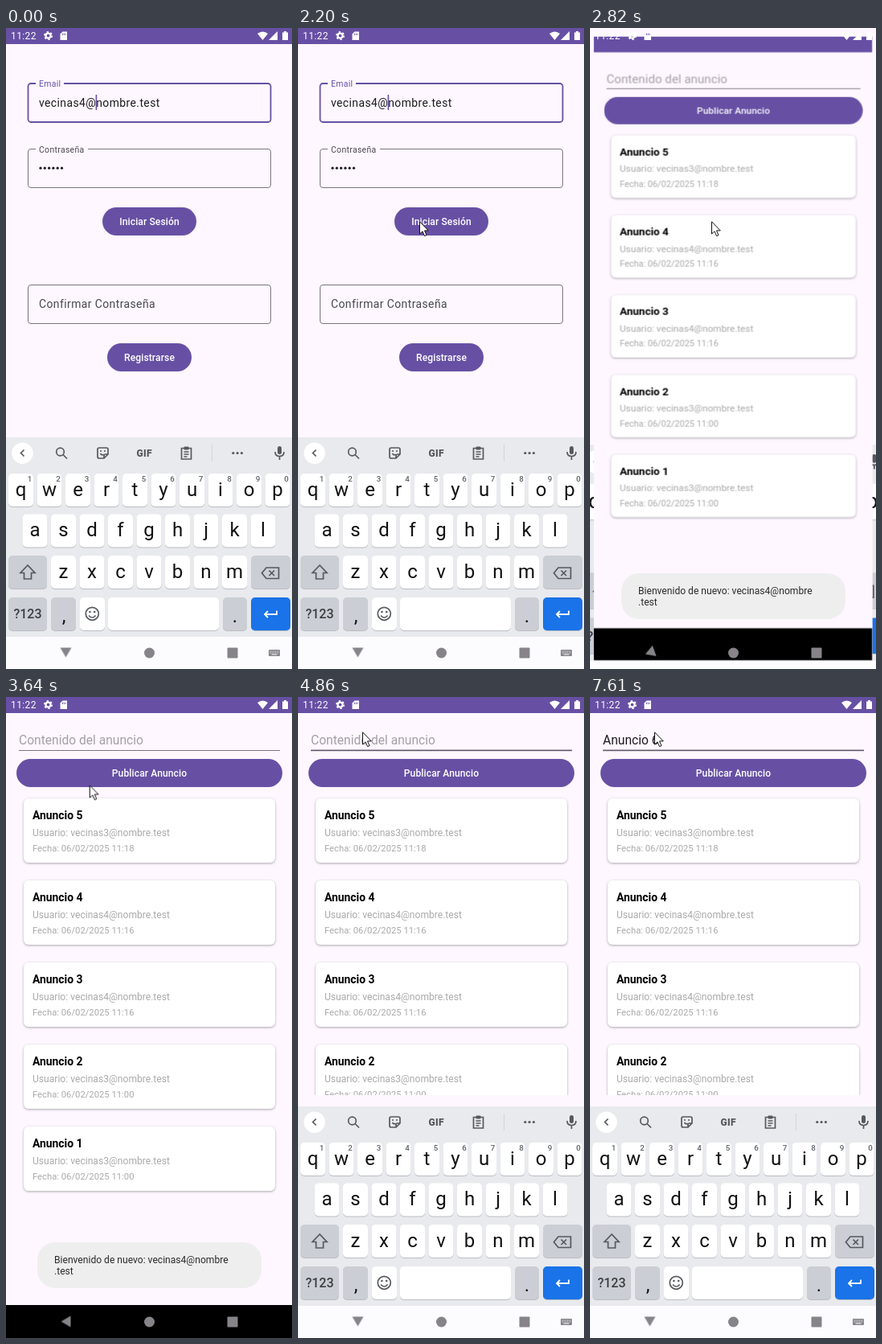
Animation of 356x797 px, one loop 8000 ms. Source, as an HTML page:

```html
<!DOCTYPE html>
<html lang="es">
<head>
<meta charset="utf-8">
<title>Anuncios</title>
<style>
  html, body { margin: 0; width: 100%; height: 100%; overflow: hidden; background: #fef7ff; }
  svg { display: block; width: 100vw; height: 100vh; font-family: Roboto, sans-serif; }
  text { white-space: pre; }
  .mid { text-anchor: middle; }
  .body { font-size: 13.9px; letter-spacing: .43px; }
  .label { font-size: 10.4px; letter-spacing: .35px; }
  .btn { font-size: 12.1px; font-weight: 500; letter-spacing: .1px; fill: #fff; text-anchor: middle; }
  .entry { font-size: 15.6px; }
  .zoom { transform-origin: 178px 398px; }
  .line { fill: none; stroke: #55595e; stroke-width: 1.7; }
  .key { font-size: 24px; text-anchor: middle; fill: #111; }
  .hint { font-size: 9.8px; font-weight: 500; text-anchor: middle; fill: #5f6368; }
  .word { font-size: 13.5px; text-anchor: middle; fill: #3c4043; }
  .card { filter: drop-shadow(0 1px 1.5px rgba(0, 0, 0, .33)); }
</style>
</head>
<body>
<svg id="stage" viewBox="0 0 356 797"></svg>
<script>
const LOOP = 8000;
const PURPLE = '#6750a4', PAPER = '#fef7ff', INK = '#1d1b20', GREY = '#49454f';
const ME = 'vecinas4@nombre.test', OTHER = 'vecinas3@nombre.test';

// Markup helpers
const rect = (x, y, w, h, fill, rx = 0, extra = '') =>
  `<rect x="${x}" y="${y}" width="${w}" height="${h}" rx="${rx}" fill="${fill}" ${extra}/>`;
const text = (x, y, s, cls, fill, extra = '') =>
  `<text x="${x}" y="${y}" class="${cls}" ${fill ? `fill="${fill}"` : ''} ${extra}>${s}</text>`;
const dot = (x, y, r, fill) => `<circle cx="${x}" cy="${y}" r="${r}" fill="${fill}"/>`;
const path = (d, extra = 'class="line"') => `<path d="${d}" ${extra}/>`;
const times = (n, fn) => Array.from({ length: n }, (_, i) => fn(i)).join('');
const button = (x, y, w, s) =>
  rect(x, y, w, 35, PURPLE, 17.5) + text(x + w / 2, y + 22, s, 'btn');

const outline = (y, color, width) =>
  rect(27.5, y, 302, 48, 'none', 3.5, `stroke="${color}" stroke-width="${width}"`);
const label = (y, s, w, color) =>
  rect(37, y - 3, w, 6, PAPER) + text(41, y + 4, s, 'label', color);

// Keyboard
function key(x, y, w, fill = '#fff') {
  return rect(x, y + 1, w, 41, '#b9bcc2', 5) + rect(x, y, w, 41, fill, 5);
}
function letters(row, x0, y, hints = '') {
  return [...row].map((c, i) => {
    const x = x0 + i * 35.5;
    return key(x - 15.5, y, 31) + text(x, y + 27.5, c, 'key') +
      (hints ? text(x + 11, y + 9.5, hints[i], 'hint') : '');
  }).join('');
}
const suggestions = [
  [5410, 5860, 'An', 'Ana', 'Antes'],
  [5860, 6080, 'Anun', 'Anuncia', 'Anuncios'],
  [6080, 6280, 'Anunc', 'Anuncia', 'Anuncios'],
  [6280, 6480, 'Anunci', 'Anuncia', 'Anuncios'],
  [6480, 6680, 'Anuncio', 'Anuncia', 'Anuncios'],
  [6680, 6880, 'Anuncio', 'Anunciado', 'Anuncios'],
  [6880, 7340, 'de', 'que', 'para']
];
const tools = `<g id="tools">
  ${path('M22.5 524.5L18.5 528.5L22.5 532.5')}
  <circle cx="67.5" cy="527" r="4.8" class="line"/>${path('M71 530.5L76 535.5')}
  ${path('M116 522H125Q127 522 127 524V530L122 535H116Q114 535 114 533V524Q114 522 116 522ZM127 530H124Q122 530 122 532V535M117.5 529Q119.5 532 121.5 530')}
  ${dot(118, 526, 1, '#55595e')}${dot(123, 526, 1, '#55595e')}
  ${text(172.3, 532.5, 'GIF', 'mid', '#55595e', 'font-size="12" font-weight="900" letter-spacing=".4"')}
  ${path('M218.5 522.5H230.5V536H218.5ZM221.5 527H227.5M221.5 530H227.5M221.5 533H225.5')}
  ${rect(221.5, 520.5, 6, 4, '#55595e', 1)}
  ${rect(256, 518, 1, 21, '#d3d6da')}
  ${times(3, i => dot(282.8 + i * 5.3, 528.5, 1.6, '#55595e'))}
</g>`;
const strip = `<g id="strip" opacity="0">
  ${path('M18.5 524.5L22.5 528.5L18.5 532.5')}
  ${rect(128, 518, 1, 21, '#d3d6da')}${rect(228, 518, 1, 21, '#d3d6da')}
  ${suggestions.map(([, , ...words]) => `<g class="words">${words.map((w, i) =>
    text(78 + i * 100, 533, w, 'word')).join('')}</g>`).join('')}
</g>`;
const SOFT = '#cbced4';
const keyboard = `<g id="keyboard">
  ${rect(0, 509, 356, 288, '#e8eaed')}
  ${rect(0, 757, 356, 40, '#fcfcfe')}
  ${dot(20.5, 528.7, 13.2, '#fff')}${tools}${strip}
  ${rect(338, 520, 5, 10, '#55595e', 2.5)}
  ${path('M335 527Q335 532.5 340.5 532.5Q346 532.5 346 527M340.5 532.5V537')}
  ${letters('qwertyuiop', 18.5, 554, '1234567890')}
  ${letters('asdfghjkl', 36, 604.5)}
  ${key(3, 656, 48, SOFT)}${letters('zxcvbnm', 71.5, 656)}${key(305, 656, 49, SOFT)}
  ${path('M27 668L18 677.5H22.5V685H31.5V677.5H36Z')}
  ${path('M324 671H339.5V684.5H324L318.5 677.7ZM327.5 674.5L334 681M334 674.5L327.5 681')}
  ${key(3, 708, 48, SOFT)}${text(27, 734, '?123', 'mid', '#3c4043', 'font-size="16" font-weight="500"')}
  ${key(56, 708, 31, SOFT)}${text(72, 739, ',', 'key')}
  ${key(92, 708, 31)}<circle cx="107.3" cy="728.3" r="8" class="line"/>
  ${dot(104.4, 726, 1.3, '#55595e')}${dot(110.2, 726, 1.3, '#55595e')}
  ${path('M103 730.5Q107.3 735.5 111.6 730.5')}
  ${key(127, 708, 138)}
  ${key(270, 708, 30, SOFT)}${text(285, 739, '.', 'key')}
  ${key(305, 708, 49, '#1a73e8')}
  ${path('M337 724.5V729H322M326 725L322 729L326 733', 'fill="none" stroke="#fff" stroke-width="1.8"')}
</g>`;

const login = `<g id="login" class="zoom">
  ${rect(0, 0, 356, 797, PAPER)}${rect(0, 0, 356, 20, PURPLE)}
  ${outline(69, PURPLE, 1.8)}${label(69, 'Email', 35, PURPLE)}
  ${text(41, 98, ME, 'body', INK, 'id="email"')}
  ${rect(111, 83, 1.6, 19, PURPLE, 0, 'id="emailCaret"')}
  ${outline(150.5, '#79747e', 1)}${label(151, 'Contraseña', 65, GREY)}
  ${times(6, i => dot(43 + i * 5.3, 174.2, 1.6, INK))}
  ${button(120, 223, 117, 'Iniciar Sesión')}
  ${rect(120, 223, 117, 35, '#fff', 17.5, 'id="ripple" opacity="0"')}
  ${outline(319.5, '#79747e', 1)}${text(41, 348, 'Confirmar Contraseña', 'body', GREY)}
  ${button(126, 392, 105, 'Registrarse')}
  <use href="#keyboard"/>
</g>`;

const posts = [
  ['5', OTHER, '11:18'], ['4', ME, '11:16'], ['3', ME, '11:16'],
  ['2', OTHER, '11:00'], ['1', OTHER, '11:00']
];
const card = ([n, user, hour], i) => `<g transform="translate(0 ${i * 102})">
  ${rect(22, 126, 313, 80, '#fff', 6, 'class="card"')}
  ${text(33, 152, 'Anuncio ' + n, '', '#000', 'font-size="13.9" font-weight="700"')}
  ${text(33, 173, 'Usuario: ' + user, '', '#a9a9a9', 'font-size="12.1"')}
  ${text(33, 192, 'Fecha: 06/02/2025 ' + hour, '', '#a9a9a9', 'font-size="11.26"')}
</g>`;
const TYPED = 'Anuncio 6';
const board = `<g id="board" class="zoom">
  ${rect(0, 0, 356, 797, PAPER)}${rect(0, 0, 356, 20, PURPLE)}
  ${text(16, 59, 'Contenido del anuncio', 'entry', '#a4a0a6', 'id="placeholder"')}
  ${text(16, 59, [...TYPED].map(c => `<tspan>${c}</tspan>`).join(''), 'entry', INK, 'id="typed"')}
  ${rect(16, 60.5, 0, 1, INK, 0, 'id="composing"')}
  ${rect(16, 66, 325, 1, '#79747e')}
  ${rect(16, 65.6, 325, 1.6, '#5e5568', 0, 'id="focus"')}
  ${rect(0, 42, 1.6, 22, '#4a4458', 0, 'id="caret"')}
  ${button(13, 77, 331, 'Publicar Anuncio')}
  ${posts.map(card).join('')}
  ${rect(0, 495, 356, 261, PAPER, 0, 'id="cover"')}
  ${rect(0, 756, 356, 41, '#000')}
</g>`;

const toast = `<g id="toast">${rect(39, 678, 279, 57, '#eeeeee', 22)}
  ${text(60, 704, 'Bienvenido de nuevo: ' + ME.slice(0, -5), '', '#2b2b2b', 'font-size="12.1"')}
  ${text(60, 718, ME.slice(-5), '', '#2b2b2b', 'font-size="12.1"')}</g>`;

const NAV = '#868489';
const system = `
  ${text(6, 14, '11:22', '', '#fff', 'font-size="12" letter-spacing=".4"')}
  <g fill="none" stroke="#fff"><circle cx="52.5" cy="9.6" r="3" stroke-width="2.2"/>
    <circle cx="52.5" cy="9.6" r="4.7" stroke-width="1.6" stroke-dasharray="2.4 2.52"/></g>
  ${path('M70.5 4.5H76V15H67.5V7.5Z', 'fill="#fff"')}
  ${path('M70.5 6.5V9M72.3 6.5V9M74.1 6.5V9', `stroke="${PURPLE}" stroke-width=".8"`)}
  ${path('M313 7Q319.5 2 326 7L319.5 15Z', 'fill="#fff"')}
  ${path('M338 4V15H327Z', 'fill="#fff"')}
  ${path('M344 5.5H346V4H349V5.5H351V15H344Z', 'fill="#fff"')}
  <g transform="translate(74.5 776.5)">${path('M-7 -6H7L0 6Z', `id="back" fill="${NAV}"`)}</g>
  ${dot(178.5, 777, 6.5, NAV)}${rect(275.5, 770.5, 13, 13, NAV, 1)}
  <g id="switcher">${rect(327, 773, 14, 8, NAV, 1)}
    ${path('M328.5 775H340M328.5 777H340', 'stroke="#fcfcfe" stroke-dasharray="1 1.2"')}
    ${rect(330.5, 778.5, 7, 1, '#fcfcfe')}</g>`;

const pointer = `<g id="pointer">${path('M.5 .8V16L4 12.8L6.6 18.6L9 17.6L6.5 11.9H11.3Z',
  'fill="#fff" stroke="#111" stroke-width="1"')}</g>`;

const $ = id => document.getElementById(id);
$('stage').innerHTML = login + board + `<g id="slide">${keyboard}</g>` + toast + system + pointer;

// Motion: each row is [ms, value], held until the next row
function play(el, prop, rows) {
  const frames = rows.map(([t, v]) => ({ offset: t / LOOP, [prop]: v, easing: 'step-end' }));
  frames.push({ offset: 1, [prop]: rows.at(-1)[1] });
  el.animate(frames, { duration: LOOP, iterations: Infinity });
}
const wrap = (rows, fn) => rows.map(([t, v]) => [t, fn(v)]);
const fade = (el, rows) => play(el, 'opacity', rows);
const show = (el, from, to = LOOP) => fade(el,
  [[0, 0], [from, 1], ...(to < LOOP ? [[to, 0]] : [])]);
const glide = (start, end, n, [x0, y0], [x1, y1]) => Array.from({ length: n }, (_, i) => {
  const u = i / (n - 1), p = 1 - (1 - u) ** 1.41;
  return [start + (end - start) * u, [x0 + (x1 - x0) * p, y0 + (y1 - y0) * p]];
});

play($('pointer'), 'transform', wrap([
  [0, [-40, 0]],
  ...glide(1180, 1520, 6, [329, 205], [151, 240]),
  ...glide(3290, 3990, 11, [143, 219], [80, 43])
], ([x, y]) => `translate(${x}px, ${y}px)`));

// Signing in
$('emailCaret').setAttribute('x', $('email').getEndPositionOfChar(8).x - .6);
fade($('emailCaret'), [[0, 1], [320, 0], [780, 1], [1180, 0], [1790, 1], [2290, 0]]);
fade($('ripple'), [[0, 0], [1790, .08], [1860, .14], [2000, .1], [2070, .05], [2140, 0]]);
fade($('toast'), [[0, 0], [2400, .2], [2470, .45], [2540, .7], [2610, .87], [2680, 1],
  [4450, .87], [4520, .6], [4590, .35], [4660, .12], [4720, 0]]);

// Screen change
const opening = [[0, 0], [2610, .03], [2680, .14], [2750, .55], [2820, .82], [2890, .94], [2960, 1]];
play($('login'), 'transform', wrap(opening, p => `scale(${1 + .1 * p})`));
play($('board'), 'transform', wrap(opening, p => `scale(${.85 + .15 * p})`));
fade($('board'), [[0, 0], [2680, .4], [2750, 1]]);

// Keyboard rising
play($('slide'), 'transform', wrap([[0, 290], [4320, 205], [4390, 110], [4450, 46.5],
  [4520, 20], [4590, 8], [4660, 2], [4720, 0]], y => `translateY(${y}px)`));
play($('back'), 'transform', wrap([[0, 0], [2680, 20], [2750, 45], [2820, 70], [2890, 84], [2960, 90],
  [4320, 80], [4390, 65], [4450, 45], [4520, 25], [4590, 10], [4660, 0]], a => `rotate(${a}deg)`));
fade($('switcher'), [[0, 1], [2680, 0], [4660, .5], [4720, 1]]);
show($('cover'), 4320);
show($('focus'), 4190);

// Typing
const strokes = [5260, 5410, 5660, 5860, 6080, 6280, 6480, 6680, 7140];
const edges = strokes.map((_, i) => $('typed').getEndPositionOfChar(i).x);
[...$('typed').children].forEach((c, i) =>
  play(c, 'visibility', [[0, 'hidden'], [strokes[i], 'visible']]));
fade($('placeholder'), [[0, 1], [5260, 0]]);
play($('caret'), 'transform', wrap([[0, 16], ...strokes.map((t, i) => [t, edges[i]])],
  x => `translateX(${x}px)`));
fade($('caret'), [[0, 0], [4320, 1], [4860, 0], [5260, 1], [7610, 0]]);
play($('composing'), 'width', wrap([[0, 0],
  ...strokes.slice(1, 7).map((t, i) => [t, edges[i + 1] - 16]), [6880, 0]], w => `${w}px`));
fade($('tools'), [[0, 1], [5410, .4], [5480, 0], [7340, 1]]);
fade($('strip'), [[0, 0], [5410, .6], [5480, 1], [7340, 0]]);
document.querySelectorAll('#slide .words').forEach((g, i) =>
  show(g, suggestions[i][0], suggestions[i][1]));
</script>
</body>
</html>
```
